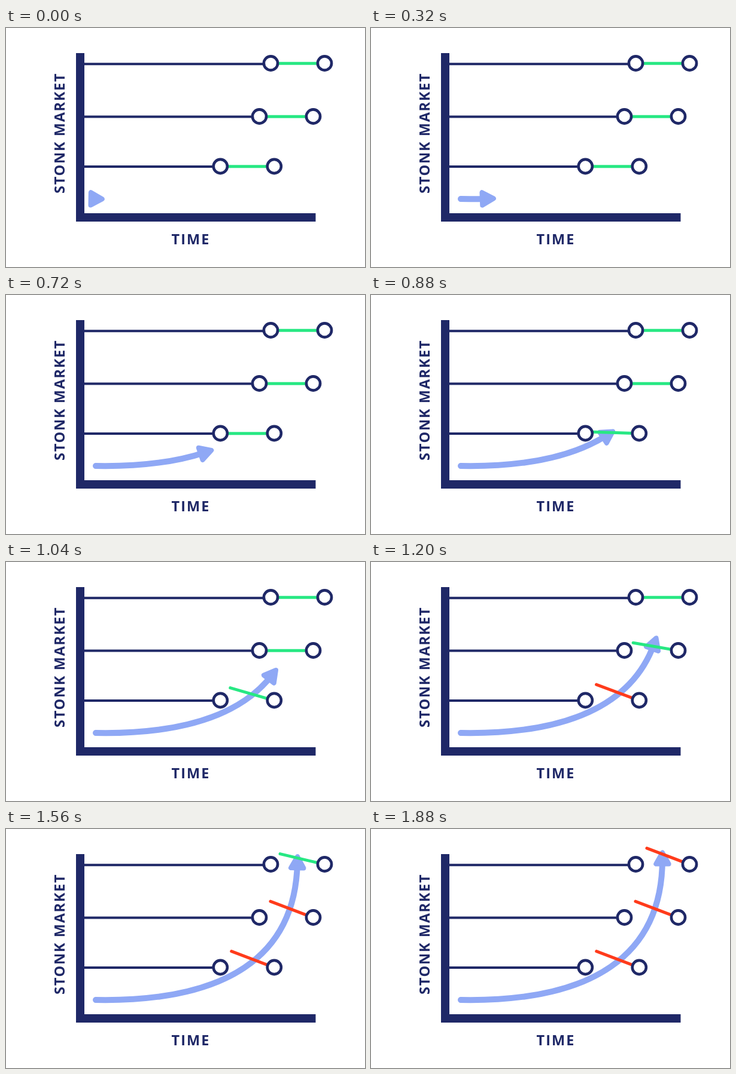
An HTML page for the animation above (2.64 s loop, 600x400 px).

```html
<!DOCTYPE html>
<html lang="en">
<head>
<meta charset="utf-8">
<title>Stonk market</title>
<style>
  html, body { margin: 0; width: 100%; height: 100%; overflow: hidden; background: #fff; }
  svg { display: block; width: 600px; height: 400px; }
  text { font: 700 23.5px "Open Sans", "Noto Sans", sans-serif; fill: #1f2867; }
  .arrow { fill: none; stroke: #8fa8f5; stroke-linecap: round; stroke-linejoin: round; }
  .head { fill: #8fa8f5; }
  .wire { stroke: #1f2867; stroke-width: 4; }
  .gate { stroke-width: 5; stroke-linecap: round; }
  .node { fill: #fff; stroke: #1f2867; stroke-width: 4.6; }
</style>
</head>
<body>
<svg viewBox="0 0 600 400">
  <path fill="#1f2867" d="M117 42h14v268h386.5v14H117z"/>
  <text x="276.5" y="362" letter-spacing="2.1">TIME</text>
  <text transform="translate(97.5 277) rotate(-90)" letter-spacing="1.7">STONK MARKET</text>
  <g id="wires"></g>
  <path id="trail" class="arrow" stroke-width="10" d="M150 286C370 290 487 212 487 50"/>
  <path id="head" class="arrow head" stroke-width="8" d="M-8.5 -10.7V10.7L10.6 0z"/>
  <g id="gates"></g>
  <g id="nodes"></g>
</svg>
<script>
const LOOP = 2640, STEP = 40;
const GREEN = '#27e883', RED = '#ff3b1b';
const SWING = 446, TURN_RED = 210, OPEN = 20.8;
const SPAN = 90, GATE = 76.5;

// Left node, wire height, and the time the arrow hits the gate
const rows = [
  { x: 442.5, y: 59, wire: 60.3, hit: 1431 },
  { x: 423.5, y: 148, wire: 148.5, hit: 1114 },
  { x: 358.3, y: 231.5, wire: 232, hit: 866 }
];

const $ = id => document.getElementById(id);
const clamp = v => Math.min(1, Math.max(0, v));

function add(parent, tag, attrs) {
  const el = document.createElementNS('http://www.w3.org/2000/svg', tag);
  for (const key in attrs) el.setAttribute(key, attrs[key]);
  return $(parent).appendChild(el);
}

for (const row of rows) {
  const { x, y, wire } = row;
  add('wires', 'line', { class: 'wire', x1: 131, x2: x, y1: wire, y2: wire });
  row.gate = add('gates', 'line', { class: 'gate', x2: -GATE });
  for (const cx of [x, x + SPAN]) add('nodes', 'circle', { class: 'node', cx, cy: y, r: 11.6 });
}

const trail = $('trail'), head = $('head');
const total = trail.getTotalLength();

function draw(t) {
  const reach = total * (1 - Math.cos(Math.PI * clamp((t + 20) / 1710))) / 2;
  const p = trail.getPointAtLength(reach);
  const a = trail.getPointAtLength(Math.max(0, reach - 1));
  const b = trail.getPointAtLength(Math.min(total, reach + 1));
  const angle = Math.atan2(b.y - a.y, b.x - a.x) * 180 / Math.PI;
  trail.setAttribute('stroke-dasharray', `0 0 ${reach} ${total * 2}`);
  head.setAttribute('transform', `translate(${p.x} ${p.y}) rotate(${angle})`);

  for (const { x, y, hit, gate } of rows) {
    const swing = OPEN * (1 - (1 - clamp((t - hit) / SWING)) ** 3);
    gate.setAttribute('transform', `translate(${x + SPAN} ${y + 0.3}) rotate(${swing})`);
    gate.setAttribute('stroke', t - hit > TURN_RED ? RED : GREEN);
  }
}

const start = performance.now();
function tick() {
  const t = (performance.now() - start) % LOOP;
  draw(Math.floor(t / STEP) * STEP);
  requestAnimationFrame(tick);
}
tick();
</script>
</body>
</html>
```
